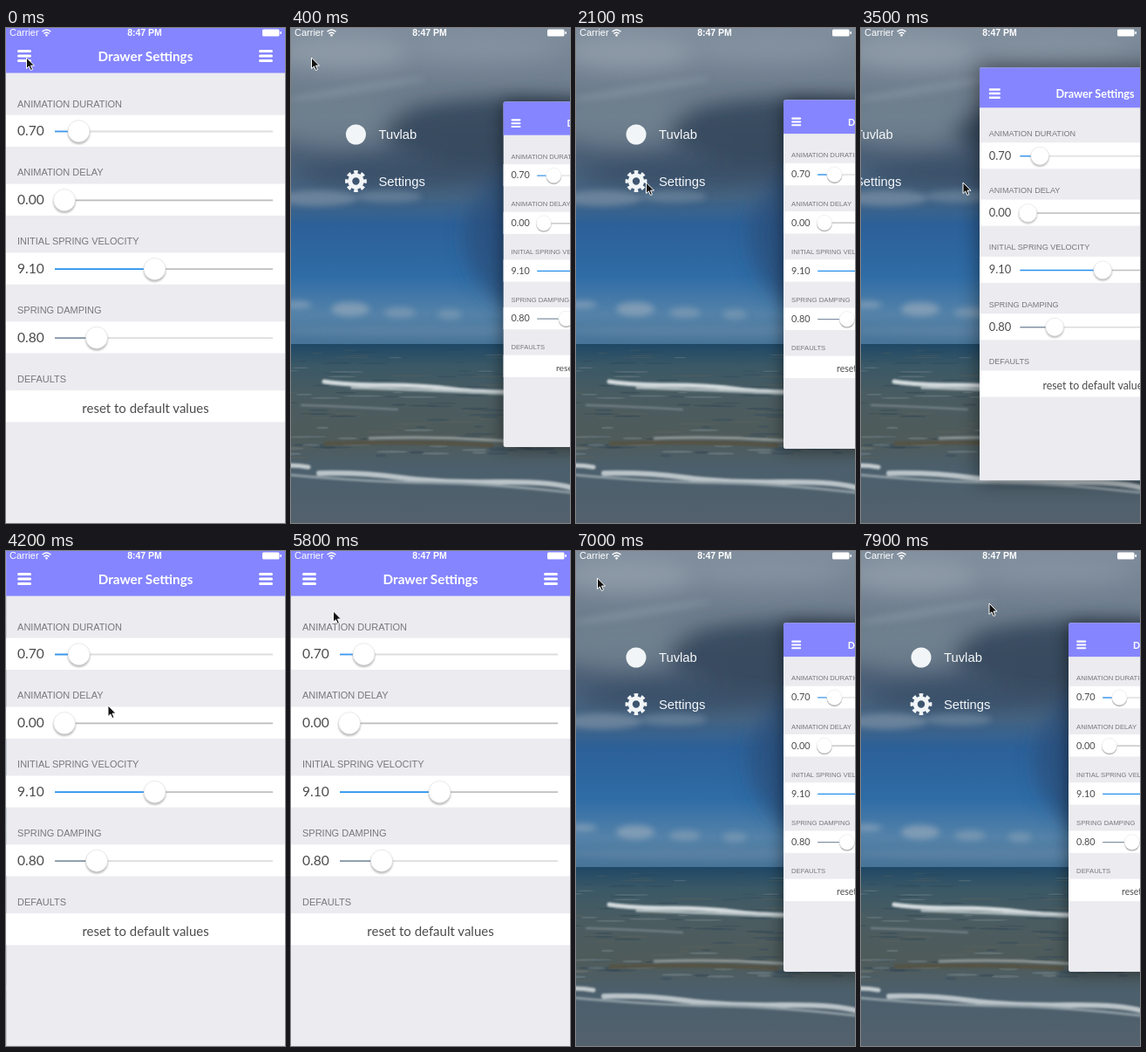
An HTML page for the animation above (8 s loop, 320 by 567 pixels).

```html
<!DOCTYPE html>
<html lang="en">
<head>
<meta charset="utf-8">
<title>Drawer settings</title>
<style>
  html, body { margin: 0; width: 100%; height: 100%; overflow: hidden; background: #2d5f8f; }
  svg { display: block; width: 320px; height: 567px; }
  text { font-family: "Liberation Sans", Arial, sans-serif; }
  .geo { font-family: Lato, "Open Sans", sans-serif; fill: #4c4c4e; }
  .head { font-size: 11px; fill: #77777d; }
  .value { font-size: 15.6px; }
  .reset { font-size: 15px; text-anchor: middle; }
  .title { font-size: 15.3px; font-weight: 700; fill: #fff; text-anchor: middle; }
  .item { font-size: 14.8px; fill: #f6f8fa; }
  .bar { font-size: 11px; fill: #fff; }
  .clock { font-size: 10.5px; font-weight: 700; text-anchor: middle; }
</style>
</head>
<body>
<svg viewBox="0 0 320 567" xmlns="http://www.w3.org/2000/svg">
  <defs>
    <linearGradient id="sky" x1="0" y1="0" x2="0" y2="1">
      <stop offset="0" stop-color="#7f8d9c"/>
      <stop offset=".22" stop-color="#6c7b8b"/>
      <stop offset=".4" stop-color="#4b5f76"/>
      <stop offset=".53" stop-color="#456584"/>
      <stop offset=".62" stop-color="#2c6098"/>
      <stop offset=".78" stop-color="#2f6ca6"/>
      <stop offset=".9" stop-color="#5482a9"/>
      <stop offset="1" stop-color="#477396"/>
    </linearGradient>
    <linearGradient id="sea" x1="0" y1="0" x2="0" y2="1">
      <stop offset="0" stop-color="#1f4866"/>
      <stop offset=".12" stop-color="#3a5866"/>
      <stop offset=".3" stop-color="#4a5c61"/>
      <stop offset=".52" stop-color="#4f5b5a"/>
      <stop offset=".7" stop-color="#4b5f6c"/>
      <stop offset="1" stop-color="#53616d"/>
    </linearGradient>
    <filter id="soft" x="-50%" y="-100%" width="200%" height="300%"><feGaussianBlur stdDeviation="11"/></filter>
    <filter id="puff" x="-50%" y="-100%" width="200%" height="300%"><feGaussianBlur stdDeviation="3.5"/></filter>
    <filter id="haze" x="-10%" y="-50%" width="120%" height="200%"><feGaussianBlur stdDeviation=".8"/></filter>
    <filter id="shade" x="-30%" y="-20%" width="160%" height="140%"><feGaussianBlur stdDeviation="14"/></filter>
    <filter id="drop" x="-30%" y="-30%" width="160%" height="170%"><feGaussianBlur stdDeviation="1"/></filter>
    <clipPath id="edge"><rect id="corner" y="-4" width="320" height="571"/></clipPath>
    <path id="burger" d="M1.5 1.5h13M1.5 7h13M1.5 12.5h13" stroke="#fff" stroke-width="3" stroke-linecap="round"/>
  </defs>

  <g id="photo">
    <rect width="320" height="364" fill="url(#sky)"/>
    <g filter="url(#soft)">
      <ellipse cx="60" cy="28" rx="75" ry="20" fill="#93a0ad" opacity=".75"/>
      <ellipse cx="220" cy="24" rx="90" ry="14" fill="#8c99a7" opacity=".6"/>
      <ellipse cx="55" cy="105" rx="80" ry="30" fill="#758592" opacity=".75"/>
      <ellipse cx="255" cy="118" rx="150" ry="38" fill="#34465b" opacity=".85"/>
      <ellipse cx="130" cy="166" rx="125" ry="17" fill="#364a62" opacity=".75"/>
      <ellipse cx="280" cy="240" rx="80" ry="85" fill="#284e78" opacity=".7"/>
    </g>
    <g filter="url(#puff)">
      <ellipse cx="30" cy="195" rx="46" ry="9" fill="#7c91a6" opacity=".7"/>
      <ellipse cx="112" cy="193" rx="38" ry="7" fill="#748ca4" opacity=".6"/>
      <ellipse cx="75" cy="70" rx="80" ry="5" fill="#92a0ad" opacity=".4" transform="rotate(-9 75 70)"/>
      <ellipse cx="68" cy="322" rx="22" ry="8" fill="#90a6ba" opacity=".75"/>
      <ellipse cx="125" cy="326" rx="18" ry="6" fill="#839eb6" opacity=".7"/>
      <ellipse cx="182" cy="328" rx="14" ry="6" fill="#839eb6" opacity=".6"/>
      <ellipse cx="8" cy="317" rx="16" ry="4" fill="#93a8bb" opacity=".7"/>
      <ellipse cx="160" cy="347" rx="170" ry="7" fill="#6388a7" opacity=".5"/>
    </g>
    <rect y="362" width="320" height="205" fill="url(#sea)"/>
    <g id="ripples"></g>
    <g filter="url(#haze)" fill="none" stroke-linecap="round">
      <path d="M38 405q28 4 70 4t80 5t140 2" stroke="#d3dadd" stroke-width="5"/>
      <path d="M70 412q70 2 180 7" stroke="#aebabd" stroke-width="3"/>
      <path d="M12 432q60 2 110 5" stroke="#76858b" stroke-width="2"/>
      <path d="M90 470q70-3 140 2t95-1" stroke="#8f9896" stroke-width="3"/>
      <path d="M40 476q110-3 190 2" stroke="#555344" stroke-width="5"/>
      <path d="M-2 501q12 0 22 2" stroke="#c3cbce" stroke-width="5"/>
      <path d="M32 510q50-1 94 5t110 5t90 8" stroke="#b9c3c8" stroke-width="6"/>
      <path d="M0 512q90 8 160 9t160 11" stroke="#8d9ba3" stroke-width="3"/>
    </g>
  </g>

  <g id="menu">
    <circle cx="69" cy="122" r="11.5" fill="#f2f5f7"/>
    <text class="item" x="95" y="127">Tuvlab</text>
    <g fill="none" stroke="#f2f5f7">
      <circle cx="69" cy="175.5" r="6.7" stroke-width="5"/>
      <circle cx="69" cy="175.5" r="10.4" stroke-width="4" pathLength="80" stroke-dasharray="5.5 4.5" stroke-dashoffset="2.75"/>
    </g>
    <text class="item" x="95" y="180.5">Settings</text>
  </g>

  <g id="card">
    <rect id="shadow" y="-4" width="320" height="571" filter="url(#shade)" opacity=".5"/>
    <g clip-path="url(#edge)">
      <rect y="-4" width="320" height="571" fill="#ebebf0"/>
      <rect y="-4" width="320" height="55.5" fill="#8585ff"/>
      <use href="#burger" x="13" y="25"/>
      <use href="#burger" x="290" y="25"/>
      <text class="geo title" x="160" y="38">Drawer Settings</text>
      <g id="rows"></g>
    </g>
  </g>

  <g id="status">
    <text class="bar" x="4" y="9">Carrier</text>
    <g fill="none" stroke="#fff" stroke-width="1.5">
      <path d="M41.500 4.300q5-4.600 10 0M43.400 6.500q3.100-2.800 6.200 0"/>
      <circle cx="46.500" cy="8.300" r=".6"/>
    </g>
    <text class="bar clock" x="159" y="9">8:47 PM</text>
    <rect x="294" y="1.500" width="19.500" height="8" rx="1.500" fill="#fff"/>
    <rect x="314.300" y="4" width="1.700" height="3" rx=".8" fill="#fff"/>
  </g>

  <path id="cursor" d="M0 0V12.500L2.900 9.900L4.900 14.500L7 13.600L5 9.100H9Z" fill="#111" stroke="#fff" stroke-width="1" stroke-linejoin="round"/>
</svg>

<script>
const $ = id => document.getElementById(id);
const LOOP = 8000, STEP = 100, OPEN_X = 238;

// Settings rows: heading, value, thumb x, track colours
const rows = [
  ["ANIMATION DURATION", "0.70", 83.5, "#3c97ea", "#dedee0"],
  ["ANIMATION DELAY", "0.00", 67, "#b9b9bb", "#bcbcbe"],
  ["INITIAL SPRING VELOCITY", "9.10", 170.5, "#2590ee", "#bfbfc1"],
  ["SPRING DAMPING", "0.80", 104, "#8292a4", "#dcdcde"],
  ["DEFAULTS"]
];
$("rows").innerHTML = rows.map(([head, value, x, low, high], i) => `
  <g transform="translate(0 ${i * 78.85})">
    <text class="head" x="13" y="90.500">${head}</text>
    <rect y="99.700" width="320" height="36.300" fill="#fff"/>
    ${value ? `
    <text class="geo value" x="13" y="123.300">${value}</text>
    <path d="M56 118.500H${x}" stroke="${low}" stroke-width="1.800"/>
    <path d="M${x} 118.500H306" stroke="${high}" stroke-width="1.800"/>
    <circle cx="${x}" cy="120.300" r="12.700" fill="#000" opacity=".28" filter="url(#drop)"/>
    <circle cx="${x}" cy="118.200" r="12.500" fill="#fff" stroke="#dcdcde" stroke-width=".6"/>` : `
    <text class="geo reset" x="160" y="125.500">reset to default values</text>`}
  </g>`).join("");

// Scattered ripples on the water, larger towards the shore
let seed = 7;
const rand = () => (seed = seed * 16807 % 2147483647) / 2147483647;
const tones = ["#7d8d92", "#31485a", "#5c625a", "#2c4250"];
let ripples = "";
for (let i = 0; i < 130; i++) {
  const depth = rand(), x = rand() * 330 - 15, y = 368 + depth * 125;
  ripples += `<ellipse cx="${x}" cy="${y}" rx="${5 + rand() * 18}" ry="${0.5 + depth * 1.2}" fill="${tones[i % 4]}" opacity=".4"/>`;
}
$("ripples").innerHTML = ripples;

// Underdamped spring: 0.7 s, damping 0.8, initial velocity 9.1
function spring(ms) {
  if (ms <= 0) return 0;
  const t = ms / 1000, zeta = 0.8, decay = 6.908 / 0.7;
  const wd = decay / zeta * Math.sqrt(1 - zeta * zeta);
  return 1 - Math.exp(-decay * t) * (Math.cos(wd * t) + (decay - 9.1) / wd * Math.sin(wd * t));
}

// Pointer stops: time, x, y
const stops = [
  [0, 23.5, 34], [1000, 23.5, 34], [2000, 80.5, 177], [2300, 80.5, 177],
  [2900, 117, 177], [5200, 117, 177], [6100, 24.5, 31], [7200, 24.5, 31],
  [7800, 147, 60], [LOOP, 147, 60]
];
function pointer(t) {
  const i = stops.findIndex(s => s[0] > t);
  const [t0, x0, y0] = stops[i - 1], [t1, x1, y1] = stops[i];
  const k = (t - t0) / (t1 - t0), e = k * k * (3 - 2 * k);
  return [x0 + (x1 - x0) * e, y0 + (y1 - y0) * e];
}

function draw(t) {
  const p = spring(t - 30) - spring(t - 3447) + spring(t - 6328);
  const left = OPEN_X * p, scale = 1 - 0.3 * p;
  $("card").setAttribute("transform", `translate(${left} ${283.5 * (1 - scale)}) scale(${scale})`);
  $("corner").setAttribute("rx", 4 * Math.min(1, Math.max(0, p)));
  $("menu").setAttribute("transform", `translate(${left - OPEN_X} 0)`);
  $("cursor").setAttribute("transform", `translate(${pointer(t)})`);
}

const start = performance.now();
let last = -1;
function tick() {
  const t = Math.floor((performance.now() - start) % LOOP / STEP) * STEP;
  if (t !== last) draw(last = t);
  requestAnimationFrame(tick);
}
tick();
</script>
</body>
</html>
```
